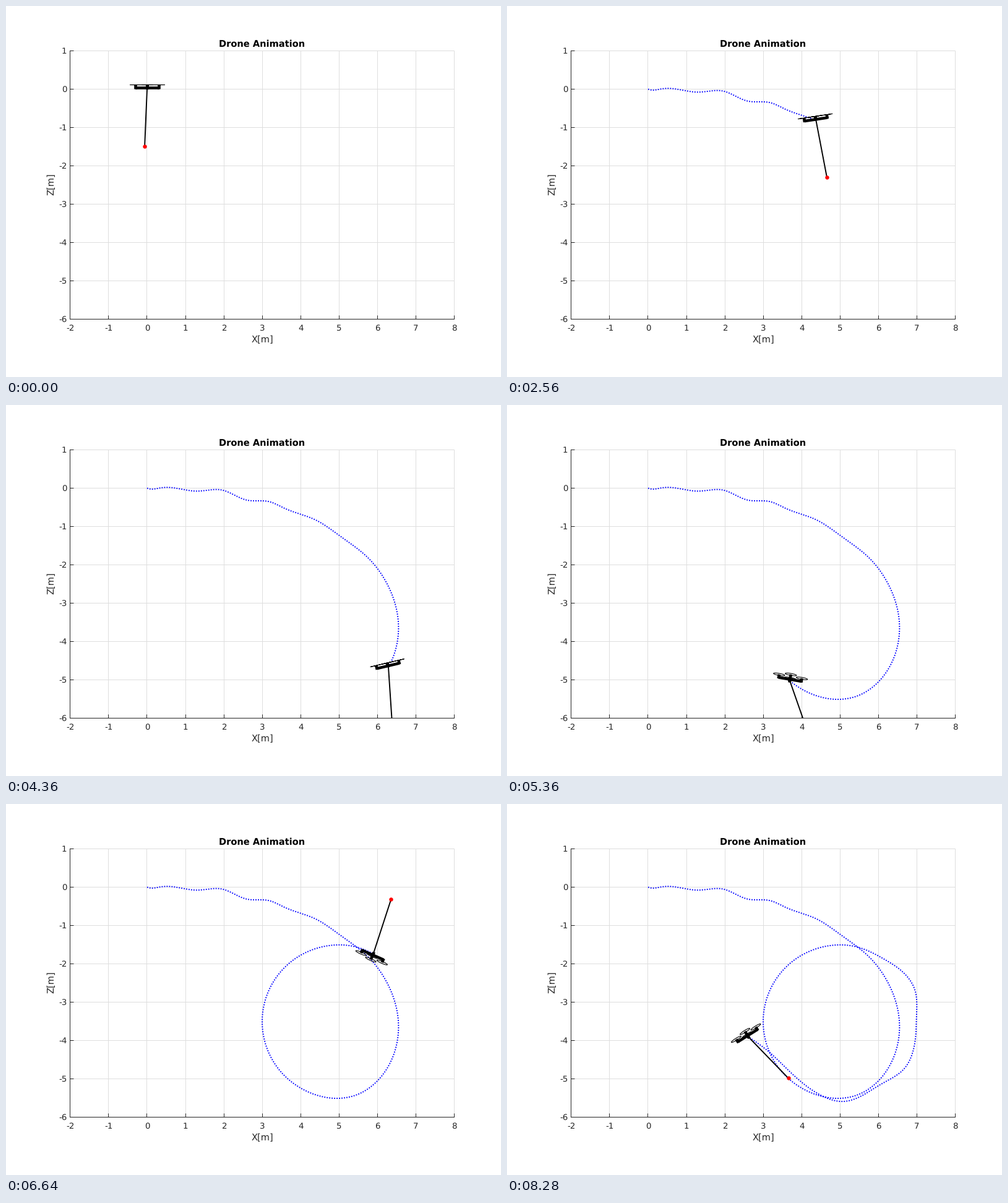
Write a matplotlib script that moves like this. It is 800 px wide and 600 px high and loops after 8320 ms.

```python
import numpy as np
import matplotlib.pyplot as plt
from matplotlib.animation import FuncAnimation

W, H, DPI = 800, 600, 100
FRAMES, INTERVAL = 208, 40
PX = 72 / DPI                     # points per pixel
LEFT, BOTTOM, UNIT_X, UNIT_Z = 103.2, 94.1, 62.1, 62.0
CABLE = 1.5
ARM, ROTOR, DECK, MAST = 0.3, 0.15, 0.035, 0.115
DARK = "#262626"

# Key points on the stage: x, y and, where it matters, the frame of passing.
ENTRY = [(228, 134.5, 0), (234, 136), (247, 134.5, 21), (260, 133.2), (309, 139.3, 36),
         (348, 137.3), (390, 154), (424, 156), (450, 167), (499.5, 185.5, 64), (540, 212),
         (586, 248), (609.5, 278, 84), (634, 350), (618, 424, 109), (570, 469)]
EXIT = [(640, 272), (659, 300), (662, 340), (659, 387), (642, 428), (603, 454, 189),
        (575, 471), (545, 481), (500, 467), (450, 426), (420, 398), (390, 376.5, 207)]


def loop(cx=538, cy=352, r=124, n=10):
    """Round part of the flight, clockwise from the bottom."""
    for u in np.linspace(0, 1, n):
        a = np.radians(180 + 216 * u)
        yield cx + r * np.sin(a), cy - r * np.cos(a), 125.3 + 42.4 * u ** 0.95


# Frame, cable from straight down, body pitch clockwise (degrees).
POSE = [(0, -2.4, 0), (21, -14, 6), (36, -22.7, 10.5), (64, 10.8, -8.6),
        (84, 27, -17), (109, 3.8, -13.3), (134, 19.2, 10), (147, -50, 44),
        (166, -198, 204), (180, -338, 330), (191, -412, 402), (207, -316, 327.8)]


def spline(x, y, t):
    """Natural cubic spline through (x, y), read at t."""
    x, y = np.asarray(x, float), np.asarray(y, float)
    h, n = np.diff(x), len(x)
    d = np.diff(y) / h
    A, b = np.eye(n), np.zeros(n)
    for i in range(1, n - 1):
        A[i, i - 1:i + 2] = h[i - 1], 2 * (h[i - 1] + h[i]), h[i]
        b[i] = 6 * (d[i] - d[i - 1])
    m = np.linalg.solve(A, b)
    i = np.clip(np.searchsorted(x, t, "right") - 1, 0, n - 2)
    p, q = x[i + 1] - t, t - x[i]
    return ((m[i] * p ** 3 + m[i + 1] * q ** 3) / (6 * h[i])
            + (y[i] / h[i] - m[i] * h[i] / 6) * p
            + (y[i + 1] / h[i] - m[i + 1] * h[i] / 6) * q)


points = ENTRY + list(loop()) + EXIT
px, py = np.array([p[:2] for p in points]).T
chord = np.r_[0, np.cumsum(np.hypot(np.diff(px), np.diff(py)))]
dist = np.linspace(0, chord[-1], 800)
path = np.c_[(spline(chord, px, dist) - LEFT) / UNIT_X - 2,
             (H - spline(chord, py, dist) - BOTTOM) / UNIT_Z - 6]

now = np.arange(FRAMES)
passing = [(p[2], c) for p, c in zip(points, chord) if len(p) == 3]
travel = spline(*zip(*passing), now)
beat, swing, pitch = zip(*POSE)
swing = np.radians(spline(beat, swing, now))
pitch = np.radians(spline(beat, pitch, now))
roll = np.radians(10) * np.clip((now - 112) / 20, 0, 1)

# Drone parts as (along, across, up); NaN rows break the line.
GAP = [(np.nan,) * 3]
HUBS = [(-ARM, 0), (ARM, 0), (0, -ARM), (0, ARM)]
frame_pts = [(-ARM, 0, DECK), (ARM, 0, DECK)] + GAP + [(0, -ARM, DECK), (0, ARM, DECK)]
rotor_pts = []
for a, b in HUBS:
    frame_pts += GAP + [(a, b, DECK - 0.03), (a, b, MAST)]
    rotor_pts += GAP + [(a + ROTOR * np.cos(q), b + ROTOR * np.sin(q), MAST)
                        for q in np.linspace(0, 2 * np.pi, 33)]
frame_pts, rotor_pts = np.array(frame_pts), np.array(rotor_pts)


def project(pts, centre, tilt, bank):
    u = pts[:, 0]
    v = pts[:, 2] * np.cos(bank) + pts[:, 1] * np.sin(bank)
    return (centre[0] + u * np.cos(tilt) + v * np.sin(tilt),
            centre[1] - u * np.sin(tilt) + v * np.cos(tilt))


plt.rcParams.update({"font.family": "DejaVu Sans", "text.hinting": "none"})
fig = plt.figure(figsize=(W / DPI, H / DPI), dpi=DPI, facecolor="white")
ax = fig.add_axes([LEFT / W, BOTTOM / H, 10 * UNIT_X / W, 7 * UNIT_Z / H])
ax.set(xlim=(-2, 8), ylim=(-6, 1), xticks=range(-2, 9), yticks=range(-6, 2))
ax.tick_params(direction="in", length=6 * PX, width=PX, color=DARK,
               labelbottom=False, labelleft=False)
for side in ("top", "right"):
    ax.spines[side].set_visible(False)
for side in ("left", "bottom"):
    ax.spines[side].set(color=DARK, linewidth=PX)
grid = dict(color="#dedede", lw=PX, zorder=0.5, clip_on=False)
ax.vlines(range(-2, 9), -6, 1, **grid)
ax.hlines(range(-6, 2), -2, 8, **grid)


def label(x, y, text, size=13.33, color=DARK, **kw):
    fig.text(x / W, 1 - y / H, text, fontsize=size * PX, color=color,
             **{"ha": "center", "va": "baseline", **kw})


for v in range(-2, 9):
    label(LEFT + (v + 2) * UNIT_X + 0.5, 525, str(v))
for v in range(-6, 2):
    label(98.5, H - BOTTOM - (v + 6) * UNIT_Z + 5, str(v), ha="right")
label(414, 66, "Drone Animation", 14.67, "black", weight="bold")
label(414, 544, "X[m]", 14.67)
label(77, 288.5, "Z[m]", 14.67, rotation=90, rotation_mode="anchor")


def line(width, color="black", **kw):
    return ax.plot([], [], color=color, lw=width * PX, solid_capstyle="butt", **kw)[0]


trail = line(1.9, "blue", linestyle=(0, (0.95, 1.15)), dash_capstyle="butt")
cable = line(1.9)
body = line(4.6)
rotors = line(1.1)
ball = ax.plot([], [], "o", color="red", ms=6.4 * PX, mew=0, clip_on=False)[0]


def draw(k):
    s = travel[k]
    pos = np.array([np.interp(s, dist, axis) for axis in path.T])
    flown = np.vstack([path[dist < s], pos])
    trail.set_data(*flown.T)
    end = pos + CABLE * np.array([np.sin(swing[k]), -np.cos(swing[k])])
    cable.set_data([pos[0], end[0]], [pos[1], end[1]])
    body.set_data(*project(frame_pts, pos, pitch[k], roll[k]))
    rotors.set_data(*project(rotor_pts, pos, pitch[k], roll[k]))
    ball.set_data([end[0]], [end[1]])
    ball.set_visible(bool(-2 <= end[0] <= 8 and -6 <= end[1] <= 1))
    return trail, cable, body, rotors, ball


anim = FuncAnimation(fig, draw, frames=FRAMES, interval=INTERVAL,
                     repeat=True, repeat_delay=0)
plt.show()
```
